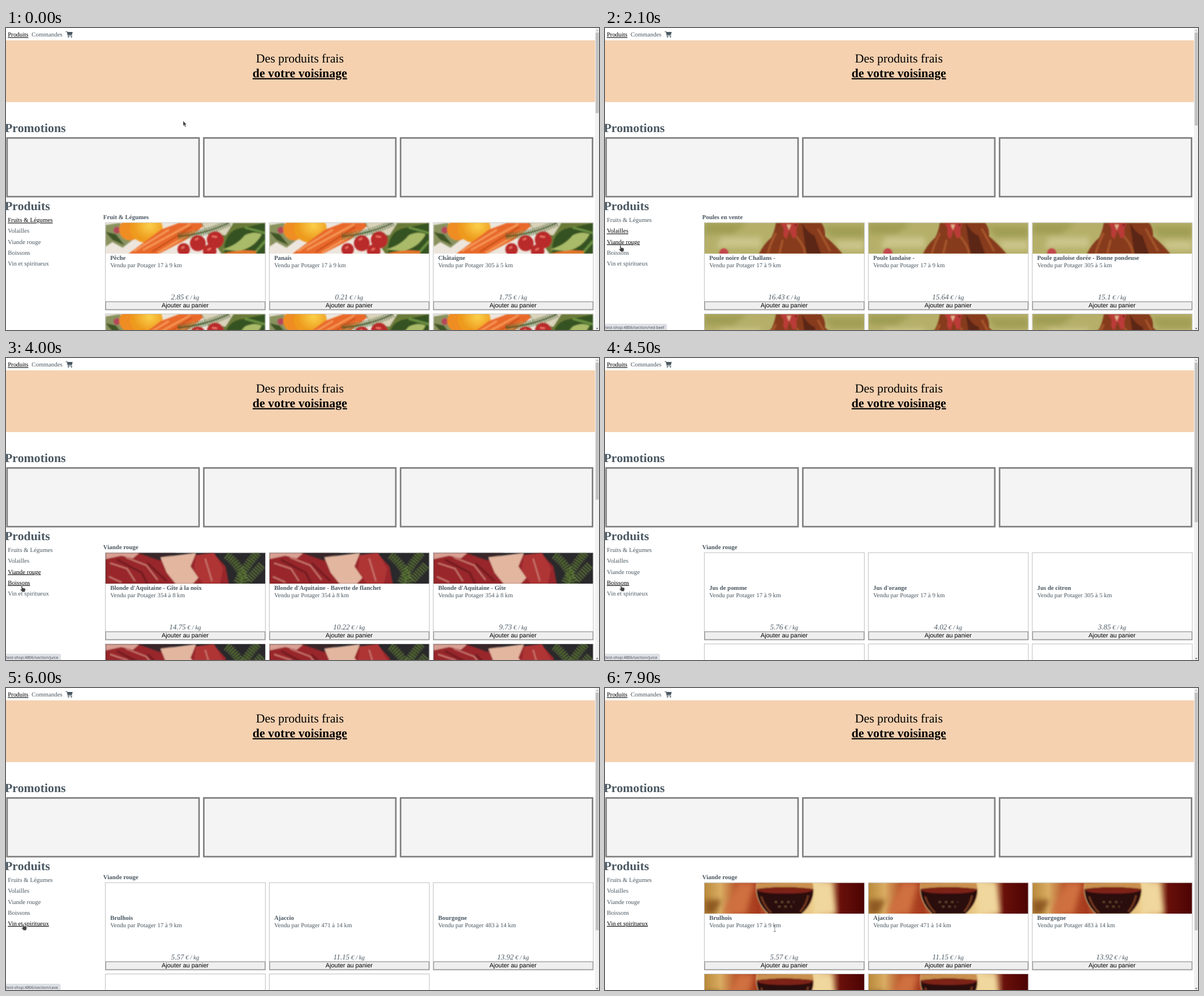
Animation, 1048 px wide and 534 px high, one loop 8000 ms. Source, as an HTML page:

```html
<!DOCTYPE html>
<html lang="fr">
<head>
<meta charset="utf-8">
<title>Produits frais</title>
<style>
  html, body { margin: 0; width: 100%; height: 100%; overflow: hidden; background: #fff; }
  svg { display: block; }
  text { font: 10.92px "Liberation Serif", serif; fill: #4a5862; text-rendering: geometricPrecision; white-space: pre; }
  .big { font-size: 21.83px; }
  .bold { font-weight: bold; }
  .mid { text-anchor: middle; }
  .price { font-style: italic; }
  .price .num { font-size: 13.1px; }
  .on { fill: #000; text-decoration: underline; }
  .black { fill: #000; }
  .label { font-family: "Liberation Sans", sans-serif; fill: #000; }
  #status text { font: 6.95px "Noto Sans", sans-serif; fill: #4a4d51; }
  #cursor path { fill: #424242; stroke: #f4f4f4; stroke-width: .5; }
</style>
</head>
<body>
<svg id="stage" width="1048" height="534" viewBox="0 0 1048 534">
  <defs>
    <clipPath id="crop"><rect width="282" height="54.5"/></clipPath>
    <filter id="soft" x="-20%" y="-20%" width="140%" height="140%"><feGaussianBlur stdDeviation="5"/></filter>
    <filter id="smooth"><feGaussianBlur stdDeviation="1"/></filter>
    <radialGradient id="pepper" cx=".6" cy=".4"><stop stop-color="#fbd04a"/><stop offset="1" stop-color="#ee9a1e"/></radialGradient>
    <linearGradient id="amber"><stop stop-color="#e9b25a"/><stop offset=".5" stop-color="#e8963a"/><stop offset="1" stop-color="#ecc382"/></linearGradient>
    <linearGradient id="glow">
      <stop stop-color="#b98a3c"/><stop offset=".1" stop-color="#d9ac62"/><stop offset=".2" stop-color="#b8572c"/>
      <stop offset=".34" stop-color="#a5391d"/><stop offset=".5" stop-color="#d9a763"/><stop offset=".7" stop-color="#ecd08e"/>
      <stop offset=".78" stop-color="#d5a468"/><stop offset=".85" stop-color="#69100a"/><stop offset="1" stop-color="#4c0303"/>
    </linearGradient>

    <g id="veg" clip-path="url(#crop)">
      <rect width="282" height="55" fill="#ece6dd"/>
      <g filter="url(#smooth)">
        <path d="M0 4L25 0L48 30L30 44L12 34L0 42Z" fill="#8a935f"/>
        <path d="M0 16L18 20L34 40L12 30Z" fill="#3f5526"/>
        <circle cx="20" cy="13" r="6" fill="#b5475a"/>
        <circle cx="43" cy="12" r="19" fill="#ef8d20"/>
        <ellipse cx="72" cy="10" rx="29" ry="25" fill="url(#pepper)"/>
        <path d="M40 55L98 12L130 0H180L142 30L94 55Z" fill="#e9692a"/>
        <path d="M66 48L150 2M92 53L158 14M50 50L112 12" stroke="#f59a58" stroke-width="3"/>
        <path d="M82 51L152 7" stroke="#bd4718" stroke-width="2"/>
        <path d="M168 0H282V55H205Z" fill="#6b7a38"/>
        <path d="M170 0H226L212 22L180 18Z" fill="#d9d3ba"/>
        <path d="M128 24Q175 20 218 0" stroke="#4c6932" stroke-width="12" stroke-dasharray="1.6 2.4" fill="none"/>
        <path d="M128 24Q175 20 218 0" stroke="#36501f" stroke-width="2" fill="none"/>
        <g fill="#b92b29">
          <circle cx="138" cy="47" r="11"/><circle cx="163" cy="36" r="14"/>
          <circle cx="194" cy="30" r="15"/><circle cx="184" cy="50" r="12"/>
        </g>
        <path d="M158 30L164 27M188 24L197 25M134 45L139 42M180 48L186 45" stroke="#ef7465" stroke-width="3"/>
        <path d="M210 40Q215 10 246 8L282 0V55H210Z" fill="#365321"/>
        <path d="M206 47Q232 40 246 22Q262 14 276 20Q264 43 236 50Z" fill="#a9bb68"/>
        <path d="M246 8L282 18M262 55L282 32" stroke="#6b9143" stroke-width="4"/>
        <path d="M206 55Q235 45 266 50V55Z" fill="#e5762c"/>
      </g>
    </g>

    <g id="hen" clip-path="url(#crop)">
      <rect width="282" height="55" fill="#b5af69"/>
      <g filter="url(#soft)">
        <path d="M0 0H75L50 20H0ZM210 6H282V25H225Z" fill="#a09e55"/>
        <path d="M30 25H100V44H20ZM228 32H282V48H240Z" fill="#cbc58a"/>
      </g>
      <g filter="url(#smooth)">
        <circle cx="34" cy="53" r="8" fill="#c2474c"/>
        <path d="M96 55Q104 38 118 26Q124 14 126 0H174L206 0Q214 9 213 24Q228 36 244 55Z" fill="#863b1d"/>
        <path d="M172 0Q184 20 194 22L206 55H180Z" fill="#5c2713"/>
        <path d="M126 18Q114 42 112 55M138 30L132 55M162 24Q176 40 178 55M200 10L222 50" stroke="#a4552a" stroke-width="4" fill="none"/>
        <path d="M134 0H166L162 13Q165 27 156 27L150 13L145 28Q137 26 140 11Z" fill="#bb3a38"/>
        <path d="M145 3L153 3L149 13Z" fill="#dfb48b"/>
        <circle cx="161" cy="4" r="1.6" fill="#24130f"/>
      </g>
    </g>

    <g id="meat" clip-path="url(#crop)">
      <rect width="282" height="55" fill="#29282b"/>
      <g filter="url(#smooth)">
        <path d="M0 0H62L104 10L190 0L212 24L218 55H0Z" fill="#98282c"/>
        <path d="M0 0H60L48 10L28 5L0 11Z" fill="#d9a094"/>
        <path d="M56 0H125L96 14Z" fill="#39272b"/>
        <path d="M97 8L160 0L150 24L164 44L154 55H124L108 35Z" fill="#e3b6a0"/>
        <path d="M160 4L192 0L208 28L202 55H172L156 30Z" fill="#af3436"/>
        <path d="M8 18L38 28L52 50M36 8L72 22L92 48M6 42L28 52M176 10L188 50" stroke="#c97870" stroke-width="2.4" fill="none"/>
        <path d="M20 12L64 35L74 55M74 18L108 50" stroke="#741d23" stroke-width="4" fill="none"/>
        <path d="M214 4Q240 24 247 55M268 0Q246 25 232 55M276 22L252 48" stroke="#6f8f3c" stroke-width="15" stroke-dasharray="1.7 3" fill="none"/>
        <path d="M214 4Q240 24 247 55M268 0Q246 25 232 55" stroke="#435d25" stroke-width="2" fill="none"/>
      </g>
    </g>

    <rect id="juice" width="282" height="54.5" fill="url(#amber)"/>

    <g id="wine" clip-path="url(#crop)">
      <rect width="282" height="55" fill="url(#glow)"/>
      <g filter="url(#soft)">
        <path d="M32 55L60 0H88L72 55Z" fill="#cf6f40"/>
        <path d="M0 30H30L18 55H0Z" fill="#8f5a22"/>
        <path d="M190 0H225L232 55H194Z" fill="#f0d79e"/>
      </g>
      <g filter="url(#smooth)">
        <path d="M92 0Q87 31 112 55H172Q199 31 191 0Z" fill="#c9904f"/>
        <path d="M91 11Q140 4 193 11Q192 36 171 55H113Q92 36 91 11Z" fill="#2b100c"/>
        <path d="M91 11Q140 4 193 11Q190 19 142 19Q94 19 91 11Z" fill="#7c2219"/>
        <path d="M100 24Q106 42 118 53M183 22Q180 38 169 51" stroke="#763b22" stroke-width="3" fill="none"/>
        <path d="M92 0Q87 31 112 55M191 0Q199 31 172 55" stroke="#ebc48d" fill="none"/>
        <path d="M124 34H158M130 42H154" stroke="#684832" stroke-width="3" stroke-dasharray="4 7"/>
      </g>
    </g>
  </defs>

  <g id="page">
    <rect y="21.83" width="1041" height="109.17" fill="#f5d1b0"/>
    <text class="on" x="3.2" y="15.3">Produits</text>
    <text x="45.2" y="15.3">Commandes</text>
    <path d="M106 6.5H108L109.8 14H116.6" fill="none" stroke="#4a5862" stroke-width="1.1" stroke-linecap="round" stroke-linejoin="round"/>
    <path d="M108.2 7H117.8L116.5 12.4H109.5Z" fill="#4a5862"/>
    <circle cx="110.3" cy="16" r="1.1" fill="#4a5862"/>
    <circle cx="115.7" cy="16" r="1.1" fill="#4a5862"/>
    <text class="big mid black" x="519.3" y="61.1">Des produits frais</text>
    <text class="big bold mid on" x="519.3" y="86.6">de votre voisinage</text>
    <text class="big bold" x="-2" y="184.1">Promotions</text>
    <text class="big bold" x="-2" y="322">Produits</text>
  </g>
  <g id="bar">
    <rect x="1041" width="7" height="534" fill="#f1f1f1"/>
    <path d="M1042.8 5.2L1044.8 3L1046.8 5.2Z" fill="#a3a3a3"/>
    <path d="M1042.8 530.6L1044.8 532.8L1046.8 530.6Z" fill="#505050"/>
    <rect id="thumb" x="1042.1" y="8" width="5.4" fill="#c1c1c1"/>
  </g>
  <g id="status">
    <rect x="-3" y="523.6" height="14" rx="2" fill="#dee1e6" stroke="#c3c6ca" stroke-width=".5"/>
    <text x=".5" y="532.2"></text>
  </g>
  <g id="cursor">
    <path d="M0 0V9.2L2 7.6L3.6 11.2L5.2 10.4L3.7 7.1L6.2 6.8Z"/>
    <path d="M-.7 1C-.7 -.1 1.2 -.1 1.3 1L1.5 4.3L5.4 5.1Q6.8 5.5 6.7 7L6.2 9.6L5.5 11.6H1.1L-2.1 8C-2.9 7.1 -2.1 6.1 -1.2 6.8L-.4 7.4Z"/>
    <path d="M-2.2 -5.2H-.3V5.2H-2.2V6H2.2V5.2H.4V-5.2H2.2V-6H-2.2Z" style="stroke-width:.2"/>
  </g>
</svg>
<script>
const LOOP = 8000, STEP = 100;
const $ = id => document.getElementById(id);

function add(parent, tag, attrs, text) {
  const node = document.createElementNS('http://www.w3.org/2000/svg', tag);
  for (const key in attrs) node.setAttribute(key, attrs[key]);
  if (text) node.textContent = text;
  return parent.appendChild(node);
}
const show = (node, on) => node.style.display = on ? '' : 'none';

// Item: name, vendor number, distance, price
const pages = [
  { at: 0, thumb: 150.5, title: 'Fruit & Légumes', photo: 'veg', count: 6, items: [
    ['Pêche', 17, 9, 2.85], ['Panais', 17, 9, 0.21], ['Châtaigne', 305, 5, 1.75]] },
  { at: 1300, thumb: 172.5, title: 'Poules en vente', photo: 'hen', count: 6, items: [
    ['Poule noire de Challans -', 17, 9, 16.43], ['Poule landaise -', 17, 9, 15.64],
    ['Poule gauloise dorée - Bonne pondeuse', 305, 5, 15.1]] },
  { at: 2900, thumb: 250.5, title: 'Viande rouge', photo: 'meat', count: 6, items: [
    ["Blonde d'Aquitaine - Gîte à la noix", 354, 8, 14.75],
    ["Blonde d'Aquitaine - Bavette de flanchet", 354, 8, 10.22],
    ["Blonde d'Aquitaine - Gîte", 354, 8, 9.73]] },
  { at: 4500, thumb: 290.5, title: 'Viande rouge', photo: 'juice', photoAt: 4600, count: 6, items: [
    ['Jus de pomme', 17, 9, 5.76], ["Jus d'orange", 17, 9, 4.02], ['Jus de citron', 305, 5, 3.85]] },
  { at: 6000, thumb: 428.5, title: 'Viande rouge', photo: 'wine', photoAt: 6100, count: 5, items: [
    ['Brulhois', 17, 9, 5.57], ['Ajaccio', 471, 14, 11.15], ['Bourgogne', 483, 14, 13.92]] },
];

const links = [
  ['Fruits & Légumes', 'fruits-veg'], ['Volailles', 'poulets'], ['Viande rouge', 'red-beef'],
  ['Boissons', 'juice'], ['Vin et spiritueux', 'cave'],
].map(([text, path], i) => {
  const node = add($('page'), 'text', { x: 3.2, y: 343.3 + 19.15 * i }, text);
  return { node, url: 'test-shop:4806/section/' + path, top: 334.3 + 19.15 * i,
           right: 3.2 + node.getComputedTextLength() };
});

for (let i = 0; i < 3; i++)
  add($('page'), 'rect', { x: 1.9 + 347.7 * i, y: 194.4, width: 339.3, height: 103.8,
    fill: '#f4f4f4', stroke: '#808080', 'stroke-width': 2.75 });

function addCard(page, i) {
  const card = add(page.node, 'g', { transform: `translate(${175 + 289.75 * (i % 3)} ${343.7 + 161.4 * (i / 3 | 0)})` });
  add(card, 'rect', { x: .6, y: .5, width: 282.8, height: 154.5, fill: '#fff', stroke: '#c4c4c4', 'stroke-width': 1.1 });
  page.photos.push(add(card, 'use', { href: '#' + page.photo, transform: 'translate(1 .9)' }));
  if (i > 2) return;
  const [name, vendor, km, cost] = page.items[i];
  add(card, 'text', { class: 'bold', x: 9.2, y: 66.4 }, name);
  add(card, 'text', { x: 9.2, y: 79 }, `Vendu par Potager ${vendor} à ${km} km`);
  const price = add(card, 'text', { class: 'price mid', x: 141.6, y: 136.5 });
  add(price, 'tspan', { class: 'num' }, String(cost));
  add(price, 'tspan', {}, ' € / kg');
  add(card, 'rect', { x: 1.2, y: 140.3, width: 281.6, height: 13.9, fill: '#efefef', stroke: '#858585', 'stroke-width': 1.1 });
  add(card, 'text', { class: 'label mid', x: 141.6, y: 150.8 }, 'Ajouter au panier');
}

for (const page of pages) {
  page.node = add($('page'), 'g', {});
  page.photos = [];
  add(page.node, 'text', { class: 'bold', x: 171.8, y: 337.8 }, page.title);
  for (let i = 0; i < page.count; i++) addCard(page, i);
}

// Pointer path: time, x, y
const path = [
  [0, 313, 164], [100, 313, 164], [1000, 27, 361], [1700, 27, 361], [2100, 27, 384], [2800, 27, 384],
  [2900, 22, 400], [3000, 22, 400], [3100, 20, 405], [3200, 20, 405], [3600, 26, 408],
  [3700, 26, 408], [4100, 28, 401], [4500, 28, 401], [5300, 29, 417], [5400, 30, 417],
  [6300, 30, 417], [6400, 29, 417], [6600, 29, 417], [7100, 33, 328], [7500, 160, 385], [7900, 300, 425],
];

const speed = (i, axis) => (path[i + 1][axis] - path[i][axis]) / (path[i + 1][0] - path[i][0]);

// Smooth speed through a key, zero at pauses and turns
function slope(i, axis) {
  if (i === 0 || i === path.length - 1) return 0;
  const a = speed(i - 1, axis), b = speed(i, axis);
  return a * b > 0 ? 2 * a * b / (a + b) : 0;
}

function pointer(t) {
  t = Math.max(0, Math.min(t, path.at(-1)[0]));
  const i = Math.max(0, path.findIndex(key => key[0] >= t) - 1);
  const from = path[i], to = path[i + 1], span = to[0] - from[0], k = (t - from[0]) / span;
  return [1, 2].map(axis => {
    const ease = k * k * (3 - 2 * k);
    return from[axis] + (to[axis] - from[axis]) * ease
      + span * k * (1 - k) * ((1 - k) * slope(i, axis) - k * slope(i + 1, axis));
  });
}

function hovered(t) {
  const [x, y] = pointer(t);
  return links.find(link => x < link.right && y >= link.top && y < link.top + 13.5);
}

// The address stays for half a second after the pointer leaves a link
function lastHovered(t) {
  for (let ago = 0; ago <= 500; ago += STEP) {
    const link = hovered(t - ago);
    if (link) return link;
  }
}

const [bubble, address] = $('status').children;

function draw(t) {
  const active = pages.findLastIndex(page => t >= page.at);
  const over = hovered(t), recent = lastHovered(t);
  pages.forEach((page, i) => {
    show(page.node, i === active);
    page.photos.forEach(photo => show(photo, t >= (page.photoAt || 0)));
  });
  links.forEach((link, i) => link.node.setAttribute('class', i === active || link === over ? 'on' : ''));
  $('thumb').setAttribute('height', pages[active].thumb - 8);

  show($('status'), recent);
  if (recent) {
    address.textContent = recent.url;
    bubble.setAttribute('width', address.getComputedTextLength() + 7.5);
  }

  const shape = over ? 1 : t >= 7800 ? 2 : 0;
  [...$('cursor').children].forEach((node, i) => show(node, i === shape));
  $('cursor').setAttribute('transform', `translate(${pointer(t)})`);
}

function tick() {
  draw(Math.floor(performance.now() % LOOP / STEP) * STEP);
  requestAnimationFrame(tick);
}
tick();
</script>
</body>
</html>
```
